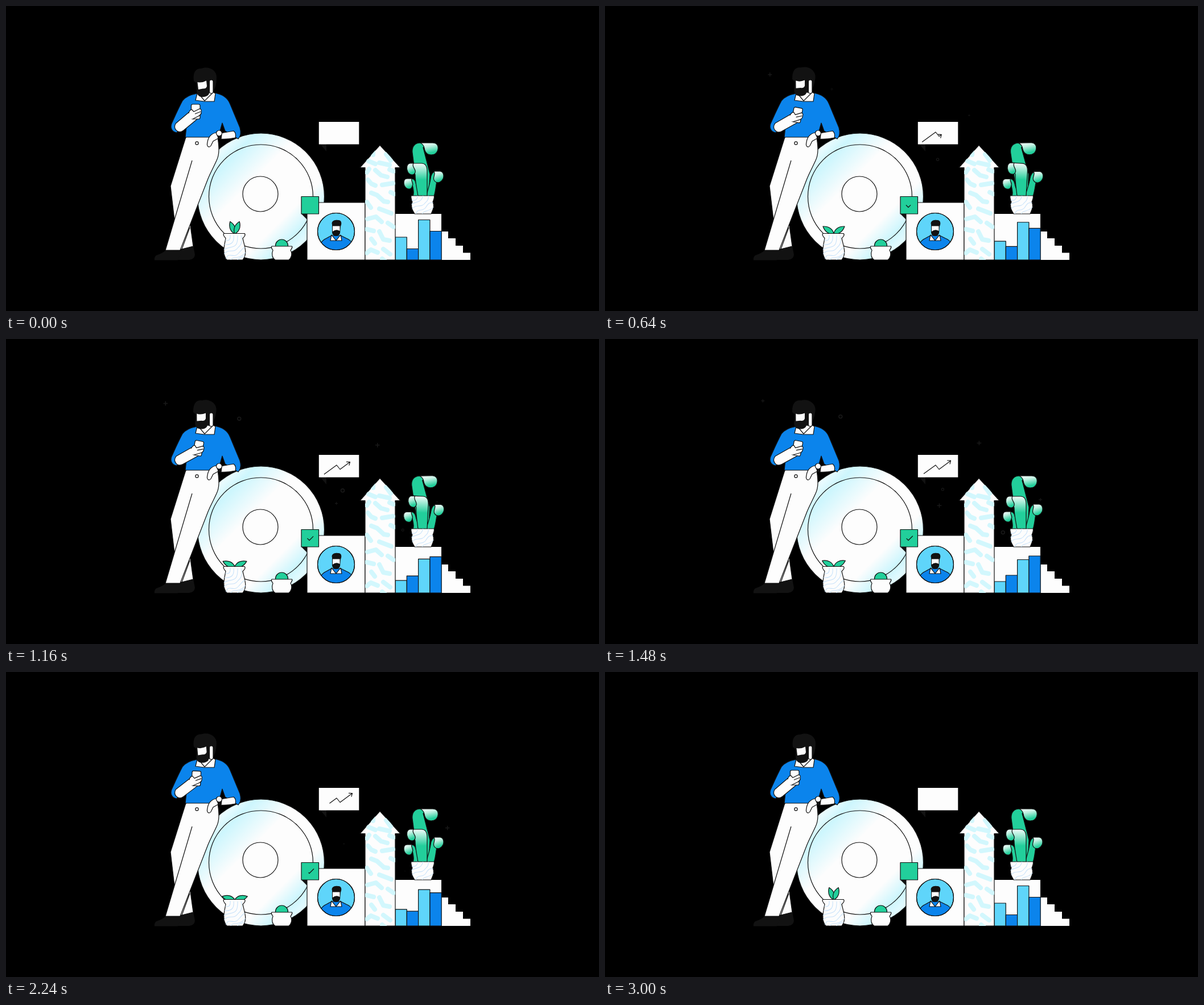
An HTML page that plays this animation: 1042 px wide and 537 px high, repeating every 3.04 s.

```html
<!DOCTYPE html>
<html lang="en">
<head>
<meta charset="utf-8">
<title>Man leaning on a coin</title>
<style>
  html, body { margin: 0; width: 100%; height: 100%; overflow: hidden; background: #000; }
  svg { display: block; width: 100%; height: 100%; }
  .line { stroke: #111; stroke-width: 1.2; stroke-linejoin: round; }
  .white { fill: #fdfdfd; }
  .dark { fill: #121212; }
  .blue { fill: #0b84ec; }
  .sky { fill: #5fd5fa; }
  .green { fill: #22cf9b; }
  .none { fill: none; }
  .wave { fill: none; stroke: #c9e3fa; stroke-width: 1.1; }
  .blob { fill: none; stroke: #d2f7fd; stroke-width: 8; stroke-linecap: round; stroke-linejoin: round; }
</style>
</head>
<body>
<svg viewBox="0 0 1042 537">
  <defs>
    <linearGradient id="shine" gradientUnits="userSpaceOnUse" x1="373" y1="260" x2="523" y2="410">
      <stop offset="0" stop-color="#e9fbfe"/>
      <stop offset=".1" stop-color="#cdf6fd"/>
      <stop offset=".36" stop-color="#fdfdfd"/>
      <stop offset=".76" stop-color="#fdfdfd"/>
      <stop offset=".92" stop-color="#cdf6fd"/>
      <stop offset="1" stop-color="#e0fafe"/>
    </linearGradient>
    <linearGradient id="frost" x1=".3" y1="0" x2=".6" y2="1">
      <stop offset="0" stop-color="#f2fcf9"/>
      <stop offset=".3" stop-color="#c3f1e3"/>
      <stop offset=".85" stop-color="#22cf9b"/>
    </linearGradient>
    <linearGradient id="frostTall" x1="0" y1="0" x2="0" y2="1">
      <stop offset="0" stop-color="#f2fcf9"/>
      <stop offset=".5" stop-color="#22cf9b"/>
    </linearGradient>
    <path id="arrow" d="M622 284.5L657 245L693 284.5H684V447H631V284.5Z"/>
    <path id="tallPot" d="M383 400.5H419C422 403 418 407 416 409C419 423 425 436 416 447H388C379 436 384 421 386 409C384 406 380 403 383 400.5Z"/>
    <path id="cactusPot" d="M712 334H752.5C753 339 751 342 750 345C754 353 749 361 747 366H718C715 361 710 353 714 345C713 342 711 338 712 334Z"/>
    <clipPath id="inArrow"><use href="#arrow"/></clipPath>
    <clipPath id="inTallPot"><use href="#tallPot"/></clipPath>
    <clipPath id="inCactusPot"><use href="#cactusPot"/></clipPath>
    <clipPath id="inAvatar"><circle cx="580" cy="397" r="32.5"/></clipPath>
  </defs>

  <g id="sparks"></g>

  <!-- coin -->
  <g class="line" fill="url(#shine)">
    <circle cx="448" cy="335.5" r="111.5"/>
    <circle cx="448" cy="335.5" r="91.5"/>
    <circle class="none" cx="447" cy="331" r="31"/>
  </g>

  <!-- man -->
  <path class="dark" d="M308 429L329 422L332 438Q331 446 322 447H298Z"/>
  <path class="dark" d="M281 430Q274 436 264 439Q260 442 261 447.500H302L309 431Z"/>
  <g class="line">
    <path class="white" d="M316 231L289 317L302 428L309 428L329 423L321 365L340 250Z"/>
    <path class="white" stroke="none" d="M317 231H372C374 245 376 260 370 272C366 281 359 294 355 304L306 430H280L327 272L312 260Z"/>
    <path class="none" d="M372 231C374 245 376 260 370 272C366 281 359 294 355 304L306 430H280L327 272M323 390L309 428"/>
    <circle class="white" cx="335.500" cy="241.500" r="2.600"/>
    <path class="blue" d="M336 154C325 156 316 159 310 167C303 180 296 196 291 207C288 215 292 222 300 223L318 204L315 231H373L380 206L385 220L408 234C413 229 413 221 411 214L394 173C389 160 379 155 366 153Z"/>
    <path class="white" d="M377 224L400 220Q405 224 403 232Q388 235 376 234Z"/>
    <path class="dark" d="M371 227L379 226L378 234L372 233Z"/>
    <path class="white" d="M370 223C360 224 355 232 354 240C352 248 357 250 360 246L364 238L373 233Z"/>
    <circle class="white" cx="374.500" cy="224" r="5"/>
    <path class="white" d="M336 154L333 166L348 168L366 168L368 154L361 150Z"/>
    <path class="none" d="M339 155L349 167L363 153"/>
  </g>
  <g id="head">
    <path class="dark" d="M330 132C328 117 333 110 343 110C355 105 370 112 370 125C370 138 367 148 362 153H357C357 158 349 161 343 160C337 159 335 154 335 148V136Z"/>
    <path class="white" d="M336.500 134Q344 136 352 131.500L353 141Q352 146 346 145.500L338 147Z"/>
  </g>
  <rect class="white line" x="357.500" y="130" width="6.500" height="24" rx="3.200"/>
  <g id="forearm" class="line white">
    <path d="M298 207L325 184L341 194L335 200L312 219C303 226 293 217 298 207Z"/>
    <rect x="325.500" y="173" width="15.500" height="26" rx="2.500"/>
    <path d="M321 189C322 184 326 181 328 184L330 186L340 181Q344 181 343 186Q344 191 338 194L329 199L319 198Z" stroke="none"/>
    <path class="none" d="M321 189C322 184 326 180 328 184L330 186L340 181Q344 181 343 186Q344 191 338 194L328 199M332 190L342 186"/>
  </g>

  <!-- small plants -->
  <g class="line green">
    <path class="leaf" d="M0 0C-6 -6 -6 -15 0 -23C6 -15 6 -6 0 0Z"/>
    <path class="leaf" d="M0 0C-6 -6 -6 -15 0 -23C6 -15 6 -6 0 0Z"/>
    <path d="M473.500 424V422A11 11 0 0 1 495.500 422V424Z"/>
  </g>
  <use href="#tallPot" class="line white"/>
  <g class="wave" clip-path="url(#inTallPot)">
    <path d="M385 412Q395 416 394 403M384 420Q402 422 400 404M382 429C395 421 408 431 407 404M381 439C392 424 399 438 408 425Q417 418 413 404M386 447C390 430 399 446 408 436S416 426 422 424M394 449C398 438 408 449 422 433M405 449Q412 440 423 441"/>
  </g>
  <path class="line white" d="M467 423H502.500C504 426 501 428 500 430C504 437 501 444 497 447H473C468 444 466 437 469 430C468 428 465 426 467 423Z"/>

  <!-- avatar card -->
  <rect class="line white" x="529" y="346" width="102" height="101"/>
  <path class="dark" d="M519 366H529V376Z"/>
  <rect class="line green" x="519" y="335.500" width="30.500" height="30.500"/>
  <path id="check" class="line none" d="M528.500 350L533 354.500L541 346.500"/>
  <circle class="line sky" cx="580" cy="397" r="32.500"/>
  <g clip-path="url(#inAvatar)">
    <path class="line blue" d="M553 418Q556 412 563 409L572 404H588L598 409Q606 412 608 418V432H553Z"/>
    <path class="line white" d="M572 403L570 413H590L588 403L580 413Z"/>
    <path class="dark" d="M573 385C571 379 577 376 583 377C589 376 591 382 588 388L587 400Q585 405 580 405Q574 405 573 399Z"/>
    <path class="white" d="M574 387.500H586.500V396Q580 392 574 397Z"/>
  </g>
  <circle class="line none" cx="580" cy="397" r="32.500"/>

  <!-- speech bubble -->
  <path class="dark" d="M552 243H563V256Z"/>
  <rect class="white" x="549.800" y="204" width="70.500" height="39.500"/>
  <path id="trend" class="line none" d="M555 241L581 222L587 229.500L608.500 213.500"/>
  <path id="tip" class="line none" d="M-5 -4L0 0L-5 4"/>

  <!-- bars and stairs -->
  <path class="white" d="M684 366H765V397H777V409H790V422H803V434.500H816V447H684Z"/>
  <path class="line none" d="M765.500 366V397"/>
  <g id="bars" class="line"></g>

  <!-- big arrow -->
  <use href="#arrow" class="line white"/>
  <path class="blob" clip-path="url(#inArrow)" d="M645 252V262M637 273L649 278M668 261L676 272M656 276L674 280M634 293L638 287M649 289L659 298L670 301M681 291L674 288M636 306L642 313L649 316M661 315L680 312M642 329L652 333L664 344L671 345M676 328L682 331M634 345L641 355M656 357L677 365M635 375L650 371L660 380M671 382L681 389M634 393L646 396M656 397L663 411L674 413M642 410L648 418M634 435L641 429L653 434M663 428L675 437M661 445L666 449"/>

  <!-- cactus -->
  <g class="line green">
    <g id="stem">
      <path d="M724 335L714 258C713 247 719 241 728 241H749L733 249L745 296L743 335Z"/>
      <path fill="url(#frost)" style="fill:url(#frost)" d="M728 241H750C757 241 760 246 759 252C758 259 753 262 747 262C739 262 736 257 735 250Q734 244 728 241Z"/>
    </g>
    <g id="rightArm">
      <path d="M739 335C740 325 744 318 746 304C747 296 750 291 757 291L759 302C755 312 756 323 752 335Z"/>
      <path style="fill:url(#frost)" d="M752 291H763C769 292 770 299 768 304C765 311 757 313 753 308C748 303 756 297 752 291Z"/>
    </g>
    <g id="leftArm">
      <path d="M710 304C718 303 720 309 721 316L727 335H715C718 328 715 321 714 314Z"/>
      <path style="fill:url(#frost)" d="M713 304H705C699 304 698 310 700 316C703 323 712 325 714 317C717 311 711 309 713 304Z"/>
    </g>
    <g id="middle">
      <path style="fill:url(#frostTall)" d="M711 277H730C738 277 740 283 740 291V335H724C722 321 719 310 719 297Z"/>
      <path style="fill:url(#frost)" d="M716 277H710C704 278 703 286 706 292C709 298 717 299 719 293C721 287 712 283 716 277Z"/>
    </g>
  </g>
  <use href="#cactusPot" class="line white"/>
  <g class="wave" clip-path="url(#inCactusPot)">
    <path d="M712 342Q724 344 723 333M711 350C722 342 729 349 733 333M713 358C721 347 730 357 737 346Q743 342 742 333M720 367C723 354 732 364 738 354S746 347 753 346M731 367C734 358 743 364 752 353"/>
  </g>
</svg>

<script>
const LOOP = 3040;
const $ = id => document.getElementById(id);
const clamp = x => Math.min(1, Math.max(0, x));
const span = (t, from, to) => clamp((t - from) / (to - from));
const smooth = x => x * x * x * (x * (6 * x - 15) + 10);
const set = (el, attrs) => { for (const k in attrs) el.setAttribute(k, attrs[k]); };
const rotate = (id, angle, x, y, shift = '') =>
  set($(id), { transform: `${shift} rotate(${angle} ${x} ${y})` });

function add(parent, tag, attrs) {
  const el = document.createElementNS(parent.namespaceURI, tag);
  set(el, attrs);
  return parent.appendChild(el);
}

// Eased value through [time, value] keys.
function keyed(t, keys) {
  let value = keys[0][1];
  for (let i = 1; i < keys.length; i++)
    value += (keys[i][1] - keys[i - 1][1]) * smooth(span(t, keys[i - 1][0], keys[i][0]));
  return value;
}

// Top edge at rest, and its travel to the middle of the loop.
const bars = [[407, 20, 'sky'], [427.5, -11.5, 'blue'], [376.5, 12, 'sky'], [396.5, -14.5, 'blue']]
  .map(([top, travel, color], i) => ({
    top, travel,
    el: add($('bars'), 'rect', { class: color, x: 684 + i * 20.3, width: 20.3 })
  }));

const PLUS = 'M-4 0H4M0 -4V4', RING = 'M3 0A3 3 0 1 1 -3 0A3 3 0 1 1 3 0Z';
const sparks = [
  [PLUS, 315, 131, 276, 101, -80, 2040],
  [RING, 389, 150, 417, 127, 340, 2300],
  [PLUS, 629, 196, 661, 174, 340, 2300],
  [RING, 574, 273, 594, 262, 200, 1900],
  [PLUS, 569, 285, 594, 305, 800, 2440],
  [PLUS, 750, 289, 778, 266, 920, 3020],
  [RING, 694, 332, 701, 352, 820, 2360]
].map(([d, x0, y0, x1, y1, from, to]) => ({
  x0, y0, x1, y1, from, to,
  el: add($('sparks'), 'path', { d, fill: 'none', stroke: '#191919', 'stroke-width': 1.6 })
}));

const leaves = [...document.querySelectorAll('.leaf')];
const trend = $('trend'), check = $('check');

function trim(path, start, end) {
  const length = path.getTotalLength();
  const visible = Math.max(0, end - start) * length;
  set(path, {
    'stroke-dasharray': `0 ${start * length} ${visible} 999`,
    visibility: visible > 1 ? 'visible' : 'hidden'
  });
}

function drawLines(t) {
  const end = 1 - (1 - span(t, 0, 2000)) ** 3;
  const start = clamp(.09 * t / 1480 + .9 * Math.max(0, (t - 1480) / 1480) ** 3.2);
  trim(trend, start, end);
  trim(check, start, end);
  const at = end * trend.getTotalLength();
  const a = trend.getPointAtLength(Math.max(0, at - 1)), b = trend.getPointAtLength(at);
  const angle = Math.atan2(b.y - a.y, b.x - a.x) * 180 / Math.PI;
  set($('tip'), {
    transform: `translate(${b.x} ${b.y}) rotate(${angle})`,
    visibility: trend.getAttribute('visibility')
  });
}

function render(t) {
  const look = keyed(t, [[0, 0], [800, 1], [1740, 1], [2500, 0]]);
  rotate('forearm', 11 * look, 303, 213);
  rotate('head', 6 * look, 362, 150, `translate(${-3 * look} 0)`);

  const rise = smooth(1 - Math.abs(t / (LOOP / 2) - 1));
  for (const { top, travel, el } of bars) {
    const y = top + travel * rise;
    set(el, { y, height: 447 - y });
  }

  const spread = keyed(t, [[400, 0], [840, 1], [1300, .7], [1960, .7], [2240, .92], [2700, 0]]);
  leaves.forEach((leaf, i) =>
    set(leaf, { transform: `translate(402 401) rotate(${(i ? 1 : -1) * (21 + 59 * spread)})` }));

  const sway = Math.sin(Math.PI * span(t, 400, 1380)) ** 2;
  rotate('stem', -2 * sway, 733, 334);
  rotate('middle', 6.5 * sway, 731, 334);
  rotate('leftArm', -2.5 * sway, 721, 334);
  rotate('rightArm', 3 * sway, 746, 334);

  drawLines(t);

  for (const { x0, y0, x1, y1, from, to, el } of sparks) {
    const k = span(t, from, to);
    const x = x0 + (x1 - x0) * (1 - (1 - k) ** 2.5), y = y0 + (y1 - y0) * k;
    set(el, { transform: `translate(${x} ${y}) scale(${Math.sin(Math.PI * k)})` });
  }
}

function tick() {
  render(performance.now() % LOOP);
  requestAnimationFrame(tick);
}
tick();
</script>
</body>
</html>
```
